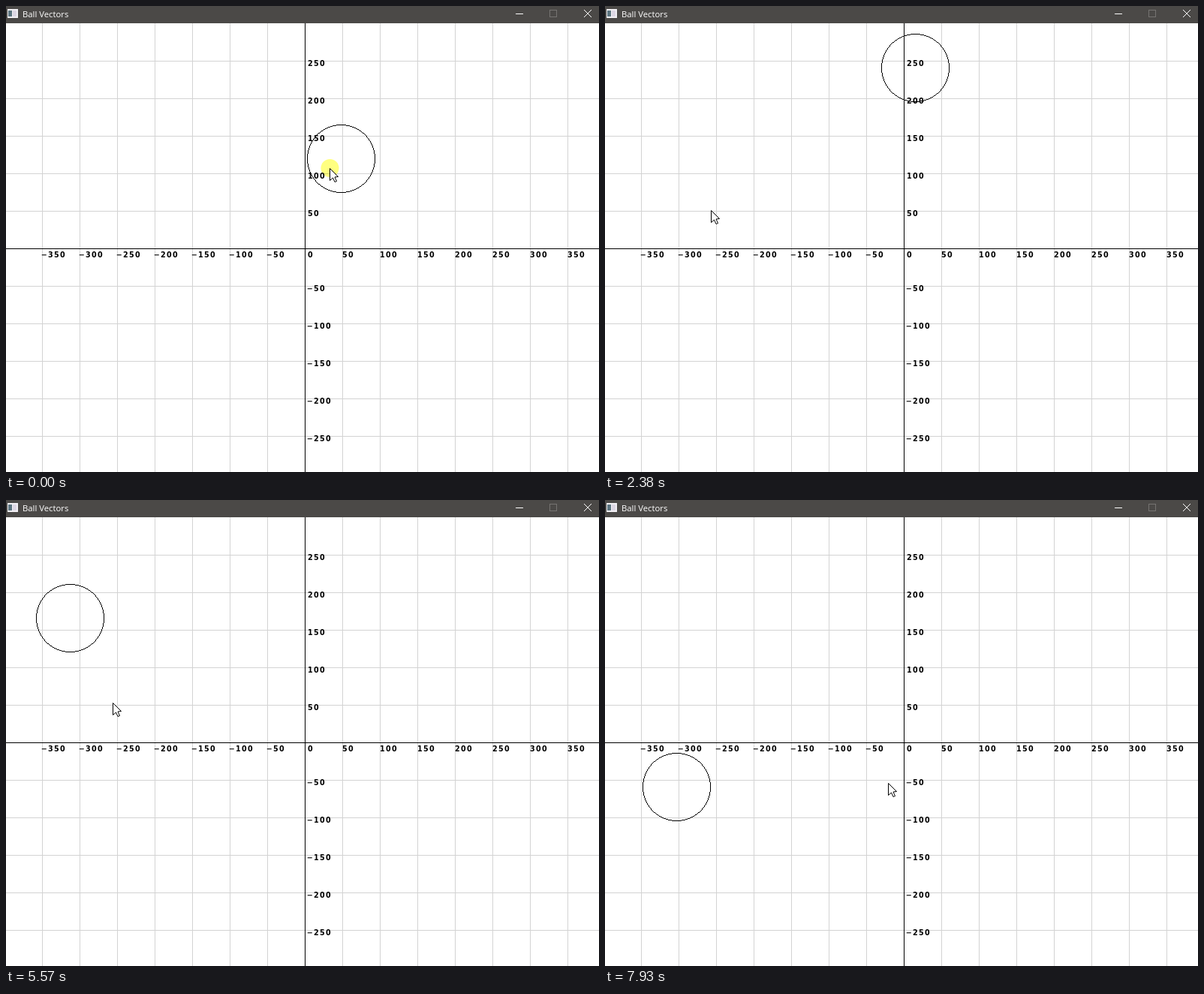
An HTML page with a canvas that plays this animation: 790 by 621 pixels, repeating every 8000 ms.

```html
<!DOCTYPE html>
<html lang="en">
<head>
<meta charset="utf-8">
<title>Ball Vectors</title>
<style>
  html, body { margin: 0; width: 100%; height: 100%; overflow: hidden; background: #fff; }
  canvas { display: block; }
</style>
</head>
<body>
<canvas id="stage" width="790" height="621"></canvas>
<script>
const ctx = document.getElementById('stage').getContext('2d');
const W = 790, H = 621, BAR = 23, STEP = 50, RADIUS = 45;
const ORIGIN = { x: 398, y: 323 };
const LOOP = 8000, FRICTION = 0.88;
const WALL = { left: 45, right: 745, top: 71.25 };

// start time, start point, and the full distance travelled before friction stops it
const SHOTS = [
  { at: 1209, x: 446.5, y: 203.5, dx: 979.5, dy: -223 },
  { at: 7457, x: 70.5, y: 160.5, dx: -223, dy: -1176 }
];
const DRAGS = [[70, 1205], [6600, 7455]];
const CLICKS = [0, 6600];

// time, x, y
const POINTER = [
  [0, 431, 216], [70, 425, 217], [800, 146, 271], [1205, 146, 272],
  [1400, 128, 270], [1680, 141, 272], [2600, 141, 272], [3100, 142, 271],
  [4400, 142, 271], [4800, 142, 270], [6000, 142, 270], [6550, 88, 172],
  [6640, 90, 180], [6880, 121, 385], [6950, 118, 402], [7430, 141, 544],
  [7510, 141, 544], [7930, 377, 377], [8000, 377, 377]
];

const mix = (a, b, u) => a + (b - a) * u;
const rgb = (a, b, u) => `rgb(${a.map((v, i) => Math.round(mix(v, b[i], u))).join()})`;

function rect(x, y, w, h, color) {
  ctx.fillStyle = color;
  ctx.fillRect(x, y, w, h);
}

function pointerAt(t) {
  let i = 1;
  while (i < POINTER.length - 1 && POINTER[i][0] < t) i++;
  const [t0, x0, y0] = POINTER[i - 1], [t1, x1, y1] = POINTER[i];
  const u = Math.min(1, Math.max(0, (t - t0) / (t1 - t0)));
  const e = u * u * (3 - 2 * u);
  return { x: Math.round(mix(x0, x1, e)), y: Math.round(mix(y0, y1, e)) };
}

function ballAt(t) {
  const shot = t < SHOTS[1].at ? SHOTS[0] : SHOTS[1];
  const run = 1 - Math.exp(-FRICTION * Math.max(0, t - shot.at) / 1000);
  let x = shot.x + shot.dx * run;
  let y = shot.y + shot.dy * run;
  if (x > WALL.right) x = 2 * WALL.right - x;
  if (x < WALL.left) x = 2 * WALL.left - x;
  if (y < WALL.top) y = 2 * WALL.top - y;
  return { x: Math.floor(x), y: Math.floor(y) };
}

function label(value, x, y) {
  const negative = value < 0;
  ctx.fillText((negative ? '\u2212' : '') + Math.abs(value), x - (negative ? 1.3 : 0), y);
}

function drawTitleBar() {
  rect(0, 0, W, BAR, '#4b4947');
  rect(2, 4, 14, 12, '#f2f0f4');
  rect(3, 6, 5, 8, '#5b7480');
  rect(9, 6, 5, 8, '#dcd6e4');
  ctx.fillStyle = '#fff';
  ctx.font = '11.3px "Open Sans", "Noto Sans", sans-serif';
  ctx.letterSpacing = '0px';
  ctx.fillText('Ball Vectors', 22, 15);
  rect(679, 10, 10, 1, '#fff');
  ctx.lineWidth = 1;
  ctx.strokeStyle = '#757371';
  ctx.strokeRect(724.5, 5.5, 9, 9);
  ctx.strokeStyle = '#fff';
  ctx.beginPath();
  ctx.moveTo(770, 5); ctx.lineTo(780, 15);
  ctx.moveTo(780, 5); ctx.lineTo(770, 15);
  ctx.stroke();
}

function drawGrid() {
  rect(0, BAR, W, H - BAR, '#fff');
  for (let x = 48; x < W; x += STEP) rect(x, BAR, 1, H - BAR, '#d3d3d3');
  for (let y = 73; y < H; y += STEP) rect(0, y, W, 1, '#d3d3d3');
  rect(ORIGIN.x, BAR, 1, H - BAR, '#000');
  rect(0, ORIGIN.y, W, 1, '#000');
  ctx.fillStyle = '#000';
  ctx.font = 'bold 9.6px "DejaVu Sans", sans-serif';
  ctx.letterSpacing = '1.3px';
  for (let v = -350; v <= 350; v += STEP) label(v, ORIGIN.x + (v || 4), 335);
  for (let v = -250; v <= 250; v += STEP) if (v) label(v, 402, 330 - v);
}

function drawRing(c, color) {
  ctx.fillStyle = color;
  for (let a = 0; a <= RADIUS * Math.SQRT1_2 + 0.5; a++) {
    const b = Math.round(Math.sqrt(RADIUS * RADIUS - a * a));
    for (const [x, y] of [[a, b], [b, a]])
      for (const sx of [-1, 1])
        for (const sy of [-1, 1]) ctx.fillRect(c.x + sx * x, c.y + sy * y, 1, 1);
  }
}

function drawPixelLine(a, b, color) {
  const n = Math.max(Math.abs(b.x - a.x), Math.abs(b.y - a.y)) || 1;
  ctx.fillStyle = color;
  for (let i = 0; i <= n; i++)
    ctx.fillRect(Math.round(mix(a.x, b.x, i / n)), Math.round(mix(a.y, b.y, i / n)), 1, 1);
}

function disc(x, y, r, color) {
  ctx.fillStyle = color;
  ctx.beginPath();
  ctx.arc(x, y, r, 0, Math.PI * 2);
  ctx.fill();
}

function drawPull(ball, aim) {
  const pull = Math.hypot(aim.x - ball.x, aim.y - ball.y);
  const u = Math.min(1, Math.max(-0.5, (pull - 231) / 76));
  ctx.globalCompositeOperation = 'multiply';
  disc(ball.x + 0.5, ball.y + 0.5, RADIUS, rgb([98, 120, 220], [200, 160, 255], u));
  drawPixelLine(ball, aim, rgb([165, 160, 232], [236, 236, 238], u));
  ctx.globalCompositeOperation = 'source-over';
  return rgb([0, 16, 100], [45, 0, 85], u);
}

function drawPointer({ x, y }) {
  ctx.save();
  ctx.translate(x + 0.5, y + 0.5);
  ctx.beginPath();
  ctx.moveTo(0, 0);
  for (const [px, py] of [[0, 16], [4, 12.5], [6.5, 18], [9, 17], [6.5, 11.5], [11, 11]])
    ctx.lineTo(px, py);
  ctx.closePath();
  ctx.fillStyle = '#fff';
  ctx.fill();
  ctx.strokeStyle = '#000';
  ctx.stroke();
  ctx.restore();
}

function hold(t) {
  const base = t < 2520 ? 0 : 2520, len = base ? 69.36 : 70;
  return base + Math.floor((t - base + (base ? 8 : 0.5)) / len) * len;
}

function draw(t) {
  const pointer = pointerAt(t), ball = ballAt(t);
  drawGrid();
  let outline = '#000';
  if (DRAGS.some(([from, to]) => t >= from && t < to)) outline = drawPull(ball, pointerAt(t - 70));
  drawRing(ball, outline);
  for (const at of CLICKS) {
    const age = t - at;
    if (age >= 0 && age < 210) {
      ctx.globalAlpha = 1 - age / 210;
      ctx.globalCompositeOperation = 'multiply';
      disc(pointer.x + 0.5, pointer.y, 12, '#ffff80');
      ctx.globalCompositeOperation = 'source-over';
      ctx.globalAlpha = 1;
    }
  }
  drawTitleBar();
  drawPointer(pointer);
}

const start = performance.now();
function tick() {
  draw(hold((performance.now() - start) % LOOP));
  requestAnimationFrame(tick);
}
tick();
</script>
</body>
</html>
```
